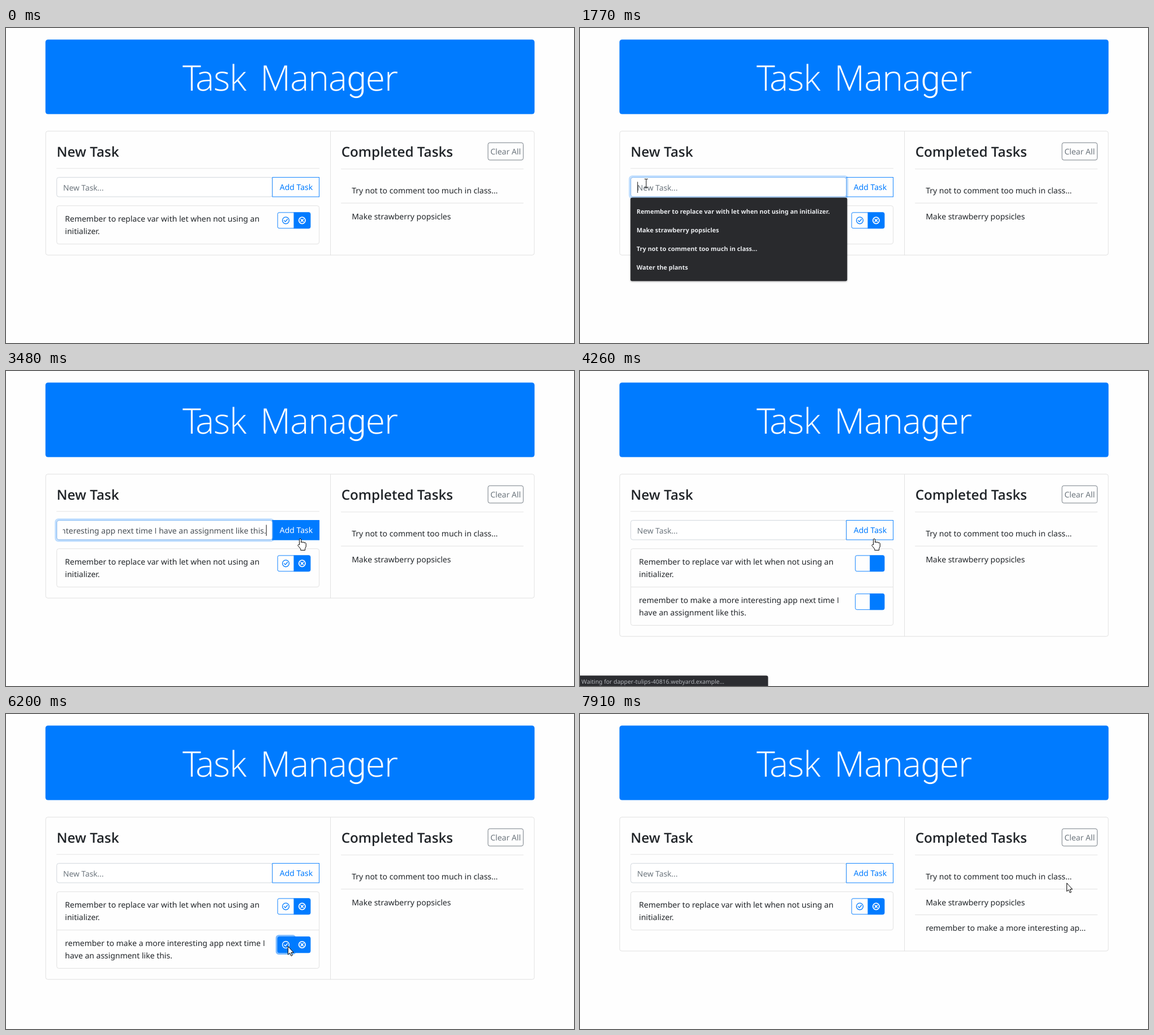
These frames come from a looping animation (1004x558 px, 7990 ms). An HTML page:

```html
<!DOCTYPE html>
<html lang="en">
<head>
<meta charset="utf-8">
<title>Task Manager</title>
<style>
html, body { margin: 0; width: 100%; height: 100%; overflow: hidden; background: #fefefe; }
svg { display: block; width: 100%; height: 100%; }
text { font: 15.05px "Noto Sans", "Open Sans", sans-serif; fill: #212529; text-rendering: geometricPrecision; white-space: pre; }
.bar { font-family: "Open Sans", "Noto Sans", sans-serif; }
.title text { font: 300 67.2px "Open Sans", "Noto Sans", sans-serif; letter-spacing: -1.1px; fill: #fff; }
.title .g { font-family: Roboto, sans-serif; }
.head { font: 600 26.1px "Open Sans", "Noto Sans", sans-serif; }
.field text { fill: #495057; }
.field .hint { fill: #6c757d; font-size: 14.8px; }
.blue { fill: #007bff; }
.addHot text { fill: #fff; }
.edge { fill: none; stroke: #dfdfdf; }
.rule { fill: none; stroke: #e5e5e5; }
.prim { fill: #fefefe; stroke: #007bff; }
.ring { fill: none; stroke: #007bff; stroke-width: 3.2; stroke-opacity: .5; }
.icon { fill: none; stroke-width: 1.45; stroke-linecap: round; stroke-linejoin: round; }
.menu { filter: drop-shadow(0 1px 2px rgba(0, 0, 0, .35)); }
.menu rect { fill: #292a2d; }
.menu text { font-size: 11.7px; font-weight: 700; fill: #e8eaed; }
.status path { fill: #2c2d31; }
.status text { font-size: 10.4px; fill: #b4b7bc; }
#cursor path { fill: #fff; stroke: #000; stroke-width: 1; stroke-linejoin: round; }
#cursor #ibeam { fill: none; stroke: #222; stroke-width: 1.1; }
</style>
</head>
<body>
<svg viewBox="0 0 1004 558" preserveAspectRatio="none">
  <defs>
    <clipPath id="inner"><rect x="108" y="286" width="388" height="34"/></clipPath>
    <g id="check"><circle r="6.4"/><path d="M-3 .2L-.9 2.5 3.2 -2.2"/></g>
    <g id="cross"><circle r="6.1"/><path d="M-2.2 -2.2L2.2 2.2M2.2 -2.2L-2.2 2.2"/></g>
    <g id="pair">
      <rect class="prim" x="516.5" y="351.5" width="62" height="30" rx="3"/>
      <path class="blue" d="M547 351h28.8a3.2 3.2 0 0 1 3.2 3.2v24.6a3.2 3.2 0 0 1-3.2 3.2H547z"/>
      <use href="#check" x="532" y="366.5" class="icon" stroke="#007bff"/>
      <use href="#cross" x="563" y="366.5" class="icon" stroke="#fff" style="stroke-width:1.9"/>
    </g>
    <g id="bare">
      <rect class="prim" x="523.5" y="351.5" width="55" height="30" rx="3"/>
      <path class="blue" d="M551 351h24.8a3.2 3.2 0 0 1 3.2 3.2v24.6a3.2 3.2 0 0 1-3.2 3.2H551z"/>
    </g>
  </defs>

  <!-- The page is laid out at 1080 by 600 and shown slightly reduced. -->
  <g transform="scale(.92963 .93)">
    <g class="title">
      <rect class="blue" x="75" y="22" width="930" height="142" rx="4.8"/>
      <text x="335.6" y="119.5" dx="0 -4">Task</text>
      <text x="744.8" y="119.5" text-anchor="end">Mana<tspan class="g">g</tspan>er</text>
    </g>

    <rect id="panel" class="edge" x="75.5" y="196.5" width="929" rx="4"/>
    <path id="split" class="edge"/>
    <path class="rule" d="M96 267.5H596M637 268.5H984"/>
    <text class="head" x="96.4" y="245.7">New Task</text>
    <text class="head" x="637.5" y="245.7">Completed Tasks</text>
    <rect x="916.5" y="218.5" width="67" height="33" rx="3.5" fill="none" stroke="#6c757d"/>
    <text x="950" y="241" text-anchor="middle" style="fill:#6c757d">Clear All</text>

    <rect x="96.5" y="284.5" width="410" height="37" rx="4" fill="#fff" stroke="#ced4da"/>
    <rect class="prim" x="506.5" y="284.5" width="89" height="37"/>
    <text x="551.8" y="309" text-anchor="middle" style="fill:#007bff">Add Task</text>
    <g class="addHot" data-level="addHot">
      <rect class="blue" x="506" y="284" width="90" height="38"/>
      <text x="551.8" y="309" text-anchor="middle">Add Task</text>
    </g>
    <rect class="ring" data-level="addRing" x="504.4" y="282.4" width="93.2" height="41.2" rx="3"/>
    <rect data-on="1600-3650" x="96.5" y="284.5" width="410" height="37" rx="4" fill="none" stroke="#ced4da"/>
    <g data-level="glow">
      <rect class="ring" style="stroke-opacity:.25" x="94.4" y="282.4" width="414.2" height="41.2" rx="5"/>
      <rect x="96.5" y="284.5" width="410" height="37" rx="4" fill="none" stroke="#80bdff"/>
    </g>
    <g class="field" clip-path="url(#inner)">
      <text class="hint" data-on="0-2610 4260-7990" x="108.7" y="310">New Task...</text>
      <text data-on="2610-2690" x="108.7" y="310">r</text>
      <text data-on="2690-3650" x="494.6" y="310" text-anchor="end">remember to make a more interesting app next time <tspan class="bar">I</tspan> have an assignment like this.</text>
      <text data-on="3650-4260" x="108.7" y="310">remember to make a more interesting app next time <tspan class="bar">I</tspan> have an assignment like this.</text>
      <rect id="caret" data-on="1600-2150 2610-3650" y="293" width="1" height="21"/>
    </g>

    <rect id="list" class="edge" x="96.5" y="338.5" width="499" rx="4"/>
    <text x="112.2" y="369">Remember to replace var with let when not using an</text>
    <text x="112.2" y="393">initializer.</text>
    <use href="#pair" data-on="0-4260 4410-7990"/>
    <use href="#bare" data-on="4260-4410"/>
    <g data-on="4260-6430">
      <path class="edge" d="M97 411.5H595"/>
      <text x="112.2" y="442">remember to make a more interesting app next time <tspan class="bar">I</tspan></text>
      <text x="112.2" y="466">have an assignment like this.</text>
      <use href="#pair" y="73" data-on="4410-6430"/>
      <use href="#bare" y="73" data-on="4260-4410"/>
      <rect class="ring" data-level="doneRing" x="514.4" y="422.4" width="35.2" height="34.2" rx="4"/>
      <g data-level="doneHot">
        <path class="blue" d="M548 424h-28.8a3.2 3.2 0 0 0-3.2 3.2v24.6a3.2 3.2 0 0 0 3.2 3.2H548z"/>
        <use href="#check" x="532" y="439.5" class="icon" stroke="#fff"/>
      </g>
    </g>

    <text x="657.4" y="315">Try not to comment too much in class...</text>
    <path class="edge" d="M637 333.5H984"/>
    <text x="657.4" y="364">Make strawberry popsicles</text>
    <g data-on="6430-7990">
      <path class="edge" d="M637 382.5H984"/>
      <text x="657.4" y="413">remember to make a more interesting ap...</text>
    </g>

    <g class="menu" data-on="1680-2690">
      <rect id="menuBox" x="96" y="323" width="412" rx="3"/>
      <text x="107.6" y="353.8">Remember to replace var with let when not using an initializer.</text>
      <g data-on="1680-2610">
        <text x="107.6" y="389.3">Make strawberry popsicles</text>
        <text x="107.6" y="424.8">Try not to comment too much in class...</text>
        <text x="107.6" y="460.3">Water the plants</text>
      </g>
    </g>
  </g>

  <g class="status" data-level="status">
    <path d="M0 539.5H329a3.5 3.5 0 0 1 3.5 3.5V558H0z"/>
    <text x="2.5" y="554">Waiting for dapper-tulips-40816.webyard.example...</text>
  </g>

  <g id="cursor" data-on="1060-7990">
    <circle data-on="1600-1690 3650-3720 6050-6130" cx="-2" cy="-1" r="11" fill="#fbf000" opacity=".75"/>
    <path id="arrow" d="M.5 .5V15.2L3.7 12.3 6 17.6 8.3 16.6 6 11.4H10.3Z"/>
    <path id="ibeam" d="M-3 -7.5H-1Q0 -7.5 0 -6.5Q0 -7.5 1 -7.5H3M0 -6.5V6.5M-3 7.5H-1Q0 7.5 0 6.5Q0 7.5 1 7.5H3"/>
    <path id="hand" d="M-1.5 11V1.9a1.6 1.6 0 0 1 3.2 0V7a1.5 1.5 0 0 1 3 .3a1.5 1.5 0 0 1 3 .6a1.4 1.4 0 0 1 2.6 .9V14L8.6 17.6V20.5H.8V18.2L-3.8 12.6C-4.6 10.8-2.8 9.8-1.5 11Z"/>
  </g>
</svg>
<script>
const LOOP = 7990;
const $ = id => document.getElementById(id);

// Stepped values: [time, value] pairs, each held until the next.
const levels = {
  glow: [[0, 0], [1680, .6], [1770, 1], [3650, .5], [3720, 0]],
  addHot: [[0, 0], [3325, .5], [3400, 1], [4260, 0]],
  addRing: [[0, 0], [3650, .5], [3720, 1], [4260, 0]],
  doneHot: [[0, 0], [5420, .4], [5500, .8], [5575, 1]],
  doneRing: [[0, 0], [6130, .6], [6200, 1]],
  status: [[0, 0], [4030, .5], [4110, 1], [4650, .5], [4730, 0], [6280, .5], [6355, 1], [6600, .5], [6680, 0]]
};
const bottom = [[0, 432.5], [4260, 505.5], [6430, 451.5]];
const listEnd = [[0, 411.5], [4260, 484.5], [6430, 411.5]];
const menuHeight = [[0, 159], [2610, 52]];
const caretX = [[0, 109], [2610, 115], [2690, 494.5]];

// Pointer moves: start, last step, step count, easing power, curve points.
const moves = [
  [1060, 1450, 6, 1.5, [-29, 385], [44, 330], [117, 275]],
  [2860, 3480, 9, 2, [117, 275], [300, 207], [520, 297]],
  [4580, 5350, 11, 1.6, [520, 297], [400, 350], [498, 428]],
  [5420, 5650, 4, 1.5, [498, 428], [498, 418], [498, 411]],
  [6600, 6980, 6, 1.5, [498, 411], [508, 414], [519, 420]],
  [7210, 7440, 4, 1.3, [519, 420], [650, 380], [724, 348]],
  [7840, 7910, 2, 1, [724, 348], [790, 322], [860, 299]]
];

const step = (pairs, t) => pairs.reduce((v, p) => t >= p[0] ? p[1] : v, pairs[0][1]);
const within = (x, y, l, t, r, b) => x >= l && x < r && y >= t && y < b;

function pointer(t) {
  const m = moves.filter(v => t >= v[0]).pop();
  if (!m) return [-50, 400];
  const [from, to, n, power, a, b, c] = m;
  const done = Math.min(n, Math.floor((t - from) / (to - from) * (n - 1) + .05) + 1);
  const u = 1 - (1 - done / n) ** power;
  return [0, 1].map(i => (1 - u) ** 2 * a[i] + 2 * u * (1 - u) * b[i] + u * u * c[i]);
}

function shape(x, y, t) {
  if (within(x, y, 472, 264, 554, 300)) return "hand";
  if (t < 6130 && within(x, y, 480, 394, 510, 426)) return "hand";
  if (within(x, y, 90, 264, 472, 300) || within(x, y, 611, 323, 785, 345)) return "ibeam";
  return "arrow";
}

const timed = [...document.querySelectorAll("[data-on]")].map(el =>
  [el, el.dataset.on.split(" ").map(r => r.split("-").map(Number))]);
const faded = [...document.querySelectorAll("[data-level]")].map(el => [el, levels[el.dataset.level]]);

function draw(t) {
  for (const [el, spans] of timed)
    el.style.display = spans.some(([a, b]) => t >= a && t < b) ? "" : "none";
  for (const [el, pairs] of faded) el.style.opacity = step(pairs, t);

  const end = step(bottom, t);
  $("panel").setAttribute("height", end - 196.5);
  $("split").setAttribute("d", `M617 197V${end}`);
  $("list").setAttribute("height", step(listEnd, t) - 338.5);
  $("menuBox").setAttribute("height", step(menuHeight, t));
  $("caret").setAttribute("x", step(caretX, t));

  const [x, y] = pointer(t).map(Math.round);
  const kind = shape(x, y, t);
  $("cursor").setAttribute("transform", `translate(${x} ${y})`);
  for (const id of ["arrow", "ibeam", "hand"]) $(id).style.display = id === kind ? "" : "none";
}

let start;
function tick(now) {
  start ??= now;
  draw((now - start) % LOOP);
  requestAnimationFrame(tick);
}
draw(0);
requestAnimationFrame(tick);
</script>
</body>
</html>
```
